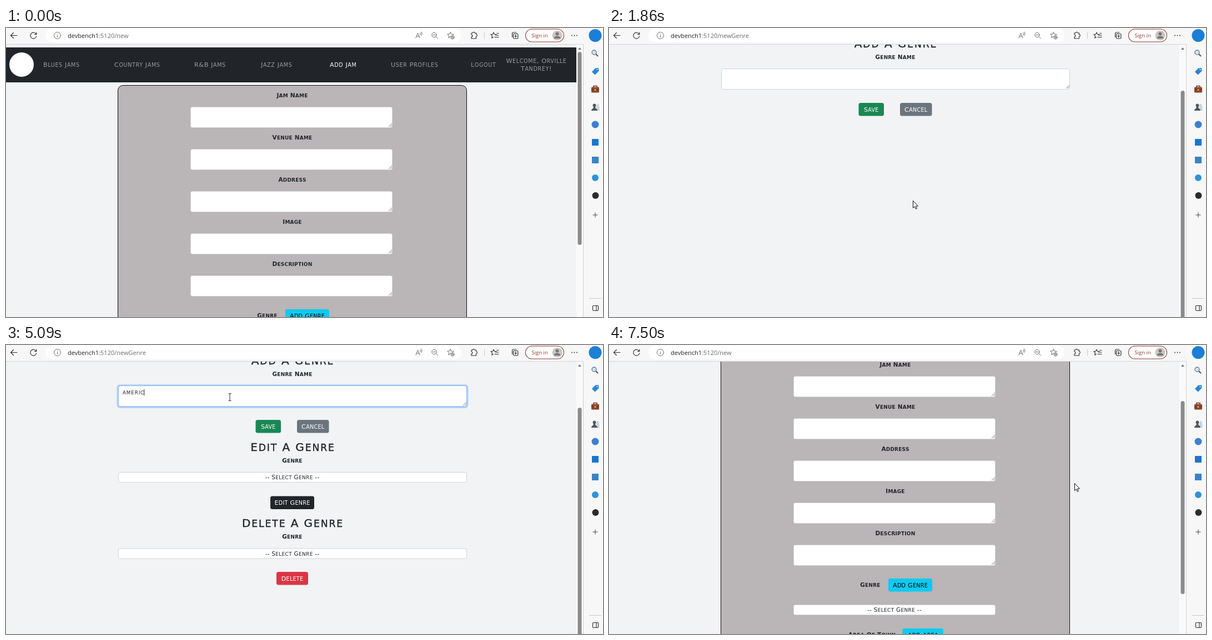
An HTML page that plays this animation: 1075 px wide and 521 px high, repeating every 8 s.

```html
<!DOCTYPE html>
<html lang="en">
<head>
<meta charset="utf-8">
<title>Add a genre</title>
<style>
html, body { margin: 0; width: 100%; height: 100%; overflow: hidden; background: #f1f3f5; }
svg { display: block; width: 1075px; height: 521px; }
text { white-space: pre; }

/* site lettering */
.label, .pick, .btn, .nav, .head, .typed { font-family: "DejaVu Sans", sans-serif; fill: #212529; }
.label, .pick, .btn, .head, .mid { text-anchor: middle; }
.label { font-size: 10.5px; font-weight: bold; letter-spacing: .2px; }
.pick { font-size: 10.5px; letter-spacing: .3px; }
.btn { font-size: 11.2px; letter-spacing: .25px; }
.nav { font-size: 11.2px; letter-spacing: .6px; fill: #9b9d9f; }
.head { font-size: 20px; letter-spacing: 1.9px; stroke: #212529; stroke-width: .4px; }
.typed { font-size: 8.8px; letter-spacing: .85px; }
.ui { font: 11px "Open Sans", sans-serif; fill: #6b6b6b; }
.tip { font: 8.4px "Liberation Sans", sans-serif; fill: #fff; text-anchor: middle; }
.line { fill: none; stroke: #2b2b2b; stroke-width: 1.1; stroke-linecap: round; stroke-linejoin: round; }
.soft { stroke: #6a6a6a; stroke-width: 1; }

/* timeline: 1% is 80 ms, every change is hard */
.a { animation: 8s step-end infinite; }
.first { animation-name: first; }
.second { animation-name: second; }
.scroll { animation-name: scroll; }
.thumb { animation-name: thumb; }
.rest { animation-name: rest; }
.tipbox { animation-name: tipbox; }
.ring { animation-name: ring; }
.type { animation-name: type; }
.caret { animation-name: caret; }
.move { animation-name: move; }
.arrow { animation-name: arrow; }
.hand { animation-name: hand; }
.beam { animation-name: beam; }

@keyframes first { 0%, 90.5%, 100% { opacity: 1 } 23.25% { opacity: 0 } }
@keyframes second { 0%, 90.5%, 100% { opacity: 0 } 23.25% { opacity: 1 } }
@keyframes scroll {
  0% { transform: translateY(0) }
  8.25% { transform: translateY(-194px) }
  9.875% { transform: translateY(-202px) }
  90.5%, 100% { transform: translateY(-86px) }
}
@keyframes thumb {
  0% { transform: translateY(0) }
  8.25% { transform: translateY(132px) }
  9.875% { transform: translateY(137px) }
  90.5%, 100% { transform: translateY(58px) }
}
@keyframes rest { 0% { opacity: 0 } 26.5%, 100% { opacity: 1 } }
@keyframes tipbox { 0%, 23.25%, 100% { opacity: 0 } 20% { opacity: .6 } 21.625% { opacity: 1 } }
@keyframes ring {
  0%, 88.75%, 100% { opacity: 0 }
  36.75%, 87.125% { opacity: .5 }
  38.625% { opacity: 1 }
}
@keyframes type {
  0% { transform: translateX(0) }
  43.75% { transform: translateX(7px) }
  55.5% { transform: translateX(15.2px) }
  58.875% { transform: translateX(21.7px) }
  60.5% { transform: translateX(28.7px) }
  62.125% { transform: translateX(32.2px) }
  63.625% { transform: translateX(38.2px) }
  68.625% { transform: translateX(53.3px) }
  70.625%, 100% { transform: translateX(60.3px) }
}
@keyframes caret {
  0%, 50.25%, 77.25%, 87.125%, 100% { opacity: 0 }
  38.625%, 55.5%, 83.75% { opacity: 1 }
}
@keyframes move {
  0% { transform: translate(919px, 377px) }
  11.625% { transform: translate(850px, 366px) }
  13.25% { transform: translate(720px, 340px) }
  14.875% { transform: translate(616px, 324px) }
  16.625% { transform: translate(597px, 324px) }
  18.375% { transform: translate(575px, 320px) }
  20% { transform: translate(556px, 314px) }
  21.625% { transform: translate(548px, 311px) }
  23.25% { transform: translate(547px, 311px) }
  26.5% { transform: translate(441px, 162px) }
  28.25% { transform: translate(439px, 148px) }
  29.875% { transform: translate(434px, 133px) }
  31.5% { transform: translate(428px, 120px) }
  33.5% { transform: translate(403px, 94px) }
  78.875% { transform: translate(412px, 98px) }
  80.5% { transform: translate(427px, 106px) }
  82.125% { transform: translate(441px, 120px) }
  83.75% { transform: translate(451px, 134px) }
  85.375% { transform: translate(459px, 142px) }
  92.125% { transform: translate(640px, 200px) }
  93.75%, 100% { transform: translate(838px, 249px) }
}
@keyframes arrow {
  0%, 18.375%, 33.5%, 85.375% { opacity: 0 }
  3.125%, 23.25%, 82.125%, 90.5%, 100% { opacity: 1 }
}
@keyframes hand { 0%, 23.25%, 90.5%, 100% { opacity: 0 } 18.375%, 85.375% { opacity: 1 } }
@keyframes beam { 0%, 82.125%, 100% { opacity: 0 } 33.5% { opacity: 1 } }
</style>
</head>
<body>
<svg viewBox="0 0 1075 521">
  <rect width="1075" height="521" fill="#f1f3f5"/>
  <rect x="1027" y="29" width="12" height="492" fill="#fafafa"/>

  <g class="a first">
    <g class="a scroll" id="jam"></g>
    <rect class="a thumb" x="1029.5" y="43" width="7" height="348" rx="3.5" fill="#8b8b8b"/>
    <g class="a tipbox">
      <rect x="600.5" y="300" width="120" height="30" rx="3" fill="#5f5d5e"/>
      <path d="M601 312l-3 3 3 3z" fill="#5f5d5e"/>
      <text class="tip" x="660.5" y="311.5">Don't see the Genre for your</text>
      <text class="tip" x="660.5" y="324.5">Jam? Add a new Genre!</text>
    </g>
  </g>

  <g class="a second">
    <g id="genre"></g>
    <rect x="1029.5" y="113" width="7" height="430" rx="3.5" fill="#8b8b8b"/>
  </g>
  <path d="M1030 39l3-4 3 4z" fill="#777"/>

  <!-- toolbar -->
  <rect width="1075" height="29" fill="#f7f7f7"/>
  <path d="M0 29.5H1040" stroke="#d5d5d5"/>
  <rect x="71" y="1" width="749" height="25" rx="12.5" fill="#fff"/>
  <g class="line">
    <path d="M20 13.5H8.5M13.5 8.5l-5 5 5 5"/>
    <path d="M54.2 11A5.5 5.5 0 1 0 54.8 14.5M54.8 8v3.5h-3.5"/>
    <g class="soft">
      <circle cx="92.5" cy="13.5" r="6"/><path d="M92.5 13v3.5M92.5 10.5v.1"/>
      <path d="M738 18l3.5-9 3.5 9M739.3 15h4.5M746 8.500q1.5 1.8 0 4M748 7q2.5 3 0 6.5"/>
      <circle cx="771" cy="12.5" r="4.2"/><path d="M774 15.5l3.5 3.5M769 12.5h4"/>
      <path d="M800.5 7.5l1.7 3.7 4 .5-3 2.7-2.7.6-3.6 3 .8-4.1-3-2.7 4-.5z"/>
      <circle cx="804" cy="17" r="3"/><path d="M802.5 17h3M804 15.5v3"/>
    </g>
    <path d="M838 9h2.5a1.7 1.7 0 0 1 3.4 0h2.6v2.5a1.9 1.9 0 0 1 0 3.8V19h-8.5v-3a2 2 0 0 0 0-4z"/>
    <path d="M861.5 8v11" stroke="#ccc"/>
    <path d="M878 8l1.5 3.2 3.5.4M878 8l-1.6 3.2-3.4.4 2.5 2.5-.7 4 2.5-1.4M881 13h6M880 16.5h7M884 9.5h3"/>
    <rect x="913.5" y="10.5" width="8.5" height="8.5" rx="1.5"/>
    <path d="M911.5 16.5v-7a1.5 1.5 0 0 1 1.5-1.5h6M917.7 12.5v4.5M915.5 14.7h4.5"/>
    <rect x="935.5" y="2" width="69" height="23" rx="11.5" fill="#fff" stroke="#8c3a2f"/>
  </g>
  <text class="ui" x="946.5" y="17" style="font-size:9.5px;fill:#8c3a2f">Sign in</text>
  <circle cx="992.5" cy="13.5" r="9" fill="#c9c7c5"/>
  <circle cx="992.5" cy="10.5" r="3" fill="#777"/>
  <path d="M986.5 19a6 4.5 0 0 1 12 0z" fill="#777"/>
  <path d="M1019 13.5h.1M1023.5 13.5h.1M1028 13.5h.1" stroke="#333" stroke-width="1.8" stroke-linecap="round"/>
  <text class="ui a first" x="111" y="17.5"><tspan fill="#222">devbench1</tspan>:5120/new</text>
  <text class="ui a second" x="111" y="17.5"><tspan fill="#222">devbench1</tspan>:5120/newGenre</text>

  <!-- sidebar -->
  <rect x="1039" y="29" width="36" height="492" fill="#f7f7f7"/>
  <path d="M1039.5 29V521" stroke="#cfcfcf"/>
  <circle cx="1061" cy="13.5" r="11.5" fill="#1b7fd6"/>
  <circle cx="1059" cy="44" r="4" fill="#cfe6f7" stroke="#66788a" stroke-width="1.3"/>
  <path d="M1062 47l4 4" stroke="#555" stroke-width="2.2"/>
  <path d="M1055 79l6-6.5 6-.5.5 5.5-7 7z" fill="#2586d8"/><circle cx="1064.5" cy="75" r="1" fill="#fff"/>
  <path d="M1058 107v-2.5h6v2.5" fill="none" stroke="#6b3524" stroke-width="1.5"/>
  <rect x="1054" y="106.5" width="14" height="10" rx="1.5" fill="#8c4630"/>
  <path d="M1054 111.5h14" stroke="#5b2a1c"/><rect x="1059.5" y="110" width="3" height="3" fill="#d9a441"/>
  <path d="M1062 149l1-8 1-4h3l1 4 1 8z" fill="#c4d8e4"/>
  <path d="M1054 149q0-3 3-4l1-3a3 3 0 1 1 3 0l1 3q3 1 3 4z" fill="#51565b"/>
  <circle cx="1061" cy="174" r="6.5" fill="#3d7fcf"/>
  <rect x="1055" y="200" width="12" height="12" fill="#1a78cc"/>
  <rect x="1055" y="232" width="12" height="12" fill="#3a83c4"/>
  <circle cx="1061" cy="270" r="6" fill="#2f93d6"/>
  <circle cx="1061.5" cy="302" r="6" fill="#2c2c30"/>
  <path d="M1056.5 337h9M1061 332.5v9" stroke="#444"/>
  <path d="M1050 487.5h22" stroke="#c8c8c8"/>
  <rect class="line" x="1056.5" y="500.5" width="10" height="9" rx="1.5"/>
  <path class="line" d="M1063 500.5v9"/>

  <!-- pointer -->
  <g class="a move" stroke-linejoin="round">
    <path class="a arrow" d="M.5.5v13l3-2.8 2 4.6 2-.9-2-4.4h4z" fill="#fff" stroke="#111"/>
    <path class="a hand" d="M-1.5 1.5a1.5 1.5 0 0 1 3 0v5q1-1 2.3.2 1.2-.7 2.2.5 1.5-.4 2 1v4q0 3-2 5.8h-6.5q-1-2.5-4-5.5-.8-1.5.5-1.9 1.2-.2 2.5 1.4z" fill="#fff" stroke="#111"/>
    <path class="a beam" d="M-2.5-6.5H-1l1 .8 1-.8h1.5M0-6V6M-2.5 6.5H-1l1-.8 1 .8h1.5" fill="none" stroke="#222"/>
  </g>
</svg>
<script>
const CYAN = '#0dcaf0', GREEN = '#198754', GREY = '#6c757d', DARK = '#212529', RED = '#dc3545';

const text = (cls, x, y, s, extra = '') => `<text class="${cls} caps" x="${x}" y="${y}" ${extra}>${s}</text>`;

const box = (x, y, w, h) =>
  `<rect x="${x + .5}" y="${y + .5}" width="${w - 1}" height="${h - 1}" rx="3" fill="#fff" stroke="#ced4da"/>`;

const area = (x, y, w, h) => box(x, y, w, h) +
  `<path d="M${x + w - 7} ${y + h - 2}l6-6M${x + w - 4} ${y + h - 2}l3-3" stroke="#777" stroke-width=".9"/>`;

const select = (x, y, w, mid, s) => box(x, y, w, 19) + text('pick', mid, y + 13, s);

const button = (x, y, w, fill, s, color = '#fff', hover) => {
  const face = (f, cls = '') =>
    `<rect class="${cls}" x="${x}" y="${y}" width="${w}" height="23.5" rx="3.5" fill="${f}"/>`;
  return face(fill) + (hover ? face(hover, 'a hand') : '') +
    text('btn', x + w / 2, y + 15.5, s, `style="fill:${color}"`);
};

const links = [[67, 'Blues Jams'], [195, 'Country Jams'], [339, 'R&B Jams'], [459, 'Jazz Jams'],
  [583, 'Add Jam'], [693, 'User Profiles'], [837, 'Logout']];
const fields = ['Jam Name', 'Venue Name', 'Address', 'Image', 'Description'];

document.getElementById('jam').innerHTML =
  `<rect y="35" width="1027" height="63" fill="${DARK}"/><circle cx="28" cy="66" r="22" fill="#fff"/>` +
  links.map(([x, s]) => text('nav', x, 70, s, s === 'Add Jam' ? 'style="fill:#fff"' : '')).join('') +
  text('nav mid', 955, 63, 'Welcome, Orville') + text('nav mid', 955, 77, 'Tandrey!') +
  '<rect x="201.5" y="103.5" width="628" height="580" rx="9" fill="#bab5b7" stroke="#111"/>' +
  fields.map((s, i) => text('label', 515.5, 124.5 + i * 76, s) + area(332, 142 + i * 76, 364, 38)).join('') +
  text('label', 470.5, 521.5, 'Genre') + button(503, 507, 79, CYAN, 'Add Genre', '#000', '#31d2f2') +
  select(332, 554, 364, 514, '-- Select Genre --') +
  text('label', 473.5, 611.5, 'Area Of Town') + button(528.5, 597, 73.5, CYAN, 'Add Area', '#000') +
  select(332, 644, 364, 514, '-- Select Area Of Town --') +
  button(449.5, 707, 45.5, GREEN, 'Save') + button(524, 707, 57.5, GREY, 'Cancel');

document.getElementById('genre').innerHTML =
  text('head', 516.5, 35, 'Add A Genre') + text('label', 515.5, 55.5, 'Genre Name') +
  area(202, 73, 628, 38) +
  text('typed', 210, 89, 'AMERICANA') +
  `<g class="a type"><rect x="209.8" y="80" width="75" height="12" fill="#fff"/>
   <rect class="a caret" x="210" y="80" width="1" height="11" fill="#222"/></g>
   <g class="a ring" fill="none"><rect x="201" y="72.5" width="630" height="40" rx="4.5" stroke="#0d6efd" stroke-opacity=".25" stroke-width="3"/>
   <rect x="202.5" y="73.5" width="627" height="37.5" rx="3" stroke="#86b7fe"/></g>` +
  button(449.5, 135, 45.5, GREEN, 'Save', '#fff', '#157347') + button(524, 135, 57.5, GREY, 'Cancel') +
  '<g class="a rest">' +
  text('head', 516.5, 190.5, 'Edit A Genre') + text('label', 515.5, 211.5, 'Genre') +
  select(202, 229, 628, 515.5, '-- Select Genre --') + button(476, 272.5, 79, DARK, 'Edit Genre') +
  text('head', 516.5, 328, 'Delete A Genre') + text('label', 515.5, 348.5, 'Genre') +
  select(202, 366.5, 628, 515.5, '-- Select Genre --') + button(487, 409, 57, RED, 'Delete') +
  '</g>';

// Lowercase runs become smaller capitals.
for (const el of document.querySelectorAll('.caps')) {
  el.innerHTML = el.textContent.replace(/[a-z]+/g, s => `<tspan font-size=".86em">${s.toUpperCase()}</tspan>`);
}
</script>
</body>
</html>
```
